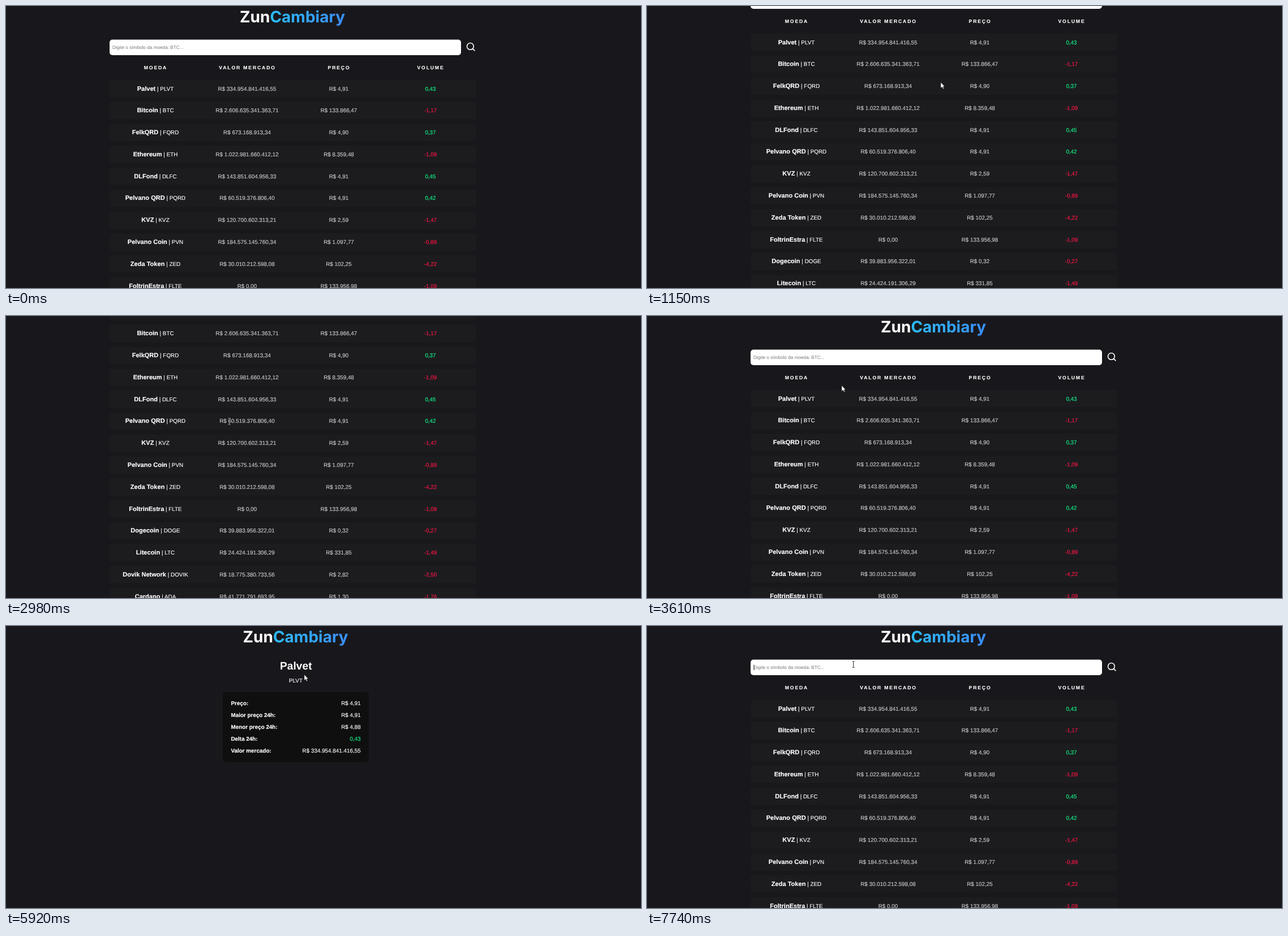
Animation of 1122x499 px, one loop 8 s. Source, as an HTML page:

```html
<!DOCTYPE html>
<html lang="pt-BR">
<head>
<meta charset="utf-8">
<title>Moedas</title>
<style>
  html, body { margin: 0; width: 100%; height: 100%; overflow: hidden; background: #18181c; }
  svg { display: block; font: 9.87px "Liberation Sans", Arial, sans-serif; fill: #fff; text-rendering: geometricPrecision; }
  .mid { text-anchor: middle; }
  .end { text-anchor: end; }
  .bold, .coin { font-weight: 700; }
  .coin { font-size: 11.06px; }
  .head { font-size: 8.64px; font-weight: 700; letter-spacing: 1.85px; }
  /* A hairline outline gives small text the weight of hinted type. */
  .ink { stroke: #fff; stroke-width: .16px; }
  .soft { fill: #cacaca; stroke: #cacaca; }
  .up { fill: #12f98a; stroke: #12f98a; }
  .down { fill: #ff1645; stroke: #ff1645; }
  .logo { font: 700 28px Inter, sans-serif; }
  #beam { mix-blend-mode: difference; }
</style>
</head>
<body>
<svg width="1122" height="499" viewBox="0 0 1122 499">
  <defs>
    <linearGradient id="blue" gradientUnits="userSpaceOnUse" x1="469" y1="4" x2="597" y2="36">
      <stop stop-color="#2cbcfa"/><stop offset="1" stop-color="#3a8eff"/>
    </linearGradient>
  </defs>
  <g id="page">
    <text class="logo mid" x="506" y="29">Zun<tspan fill="url(#blue)">Cambiary</tspan></text>
    <g id="list">
      <rect x="183" y="59.5" width="621" height="27.5" rx="5"/>
      <text x="188" y="76.3" font-size="8.22" fill="#757575">Digite o símbolo da moeda: BTC...</text>
      <path id="caret" d="M189 68.5v10" stroke="#000" stroke-width=".8"/>
      <g fill="none" stroke="#fff" stroke-width="1.6" stroke-linecap="round">
        <circle cx="820.4" cy="71.4" r="5.9"/><path d="M824.6 75.6l3.3 3.3"/>
      </g>
      <g id="heads"></g>
      <g id="rows"></g>
    </g>
    <g id="detail">
      <text class="bold mid" x="506.8" y="77.4" font-size="19.2">Palvet</text>
      <text class="mid ink" x="506.5" y="99.5">PLVT</text>
      <rect x="377.5" y="117" width="258" height="124" rx="5" fill="#0f0f0f"/>
      <g id="facts"></g>
    </g>
  </g>
  <path id="arrow" d="M0 0V10.2L2.4 8.1 4 11.6 5.7 10.9 4.1 7.5H7Z" stroke="#111" stroke-width=".5"/>
  <path id="beam" d="M-2-5.5H-.6L0-5 .6-5.5H2M0-5V5M-2 5.5H-.6L0 5 .6 5.5H2" fill="none" stroke="#ddd"/>
  <path id="hand" d="M-1 1Q0-.6 1 1V5L5.5 6Q7 6.3 6.8 8L5.8 11.5V13.5H-.8V12L-4 8.5Q-4.3 6.8-2.6 7.3L-1 8.5Z" stroke="#111" stroke-width=".5"/>
</svg>
<script>
const $ = id => document.getElementById(id);
const columns = [264, 426, 588, 750];
const rowStep = 38.78;
const tone = value => value[0] === '-' ? 'down' : 'up';
const text = (x, y, cls, body) => `<text x="${x}" y="${y}" class="ink ${cls}">${body}</text>`;

const coins = `Palvet|PLVT|334.954.841.416,55|4,91|0,43
Bitcoin|BTC|2.606.635.341.363,71|133.866,47|-1,17
FelkQRD|FQRD|673.168.913,34|4,90|0,37
Ethereum|ETH|1.022.981.660.412,12|8.359,48|-1,09
DLFond|DLFC|143.851.604.956,33|4,91|0,45
Pelvano QRD|PQRD|60.519.376.806,40|4,91|0,42
KVZ|KVZ|120.700.602.313,21|2,59|-1,47
Pelvano Coin|PVN|184.575.145.760,34|1.097,77|-0,89
Zeda Token|ZED|30.010.212.598,08|102,25|-4,22
FoltrinEstra|FLTE|0,00|133.956,98|-1,09
Dogecoin|DOGE|39.883.956.322,01|0,32|-0,27
Litecoin|LTC|24.424.191.306,29|331,85|-1,49
Dovik Network|DOVIK|18.775.380.733,56|2,82|-2,50
Cardano|ADA|41.771.791.693,95|1,30|-1,76`.split('\n').map(line => line.split('|'));

$('heads').innerHTML = ['MOEDA', 'VALOR MERCADO', 'PREÇO', 'VOLUME']
  .map((name, i) => text(columns[i] + .5, 112, 'head mid', name)).join('');

$('rows').innerHTML = coins.map(([name, symbol, cap, price, change], i) => {
  const y = 149.5 + i * rowStep;
  return `<rect x="183.3" y="${y - 18.5}" width="647.5" height="30.5" rx="4" fill="#1c1c1f"/>` +
    text(columns[0], y, 'mid', `<tspan class="coin">${name}</tspan> | ${symbol}`) +
    text(columns[1], y, 'mid soft', 'R$ ' + cap) +
    text(columns[2], y, 'mid soft', 'R$ ' + price) +
    text(columns[3], y, 'mid ' + tone(change), change);
}).join('');

$('facts').innerHTML = [['Preço:', 'R$ 4,91'], ['Maior preço 24h:', 'R$ 4,91'], ['Menor preço 24h:', 'R$ 4,88'],
  ['Delta 24h:', '0,43', 'up'], ['Valor mercado:', 'R$ 334.954.841.416,55']]
  .map(([label, value, cls = ''], i) => {
    const y = 140 + i * 20.95;
    return text(392, y, 'bold', label) + text(621.2, y, 'end ' + cls, value);
  }).join('');

// Each move: start, end, number of steps, then points along the way.
const pointerMoves = [
  [190, 680, 8, [1090, 490, 'arrow'], [1000, 400, 'arrow'], [800, 190, 'arrow'], [640, 66, 'arrow'], [519, 135, 'arrow']],
  [1490, 1960, 8, [519, 135, 'arrow'], [390, 180, 'arrow'], [246, 270, 'arrow'], [270, 320, 'arrow'], [322, 334, 'arrow']],
  [2220, 2500, 5, [322, 334, 'arrow'], [350, 260, 'arrow'], [406, 147, 'beam']],
  [2770, 2980, 4, [406, 147, 'beam'], [394.5, 186.5, 'beam']],
  [3130, 3460, 6, [394.5, 186.5, 'beam'], [346, 139, 'arrow']],
  [3610, 4090, 8, [346, 139, 'arrow'], [344, 123, 'arrow'], [325, 105, 'arrow'], [290, 88, 'arrow'],
    [255, 76, 'beam'], [225, 70, 'beam'], [205, 70, 'beam'], [195, 72, 'beam'], [191, 73, 'beam']],
  [4280, 4620, 6, [191, 73, 'beam'], [250, 84, 'beam'], [290, 112, 'arrow'], [279, 139, 'hand']],
  [4760, 4900, 2, [279, 139, 'hand'], [279.5, 145, 'hand'], [279.5, 145, 'arrow']],
  [5430, 6060, 10, [279.5, 145, 'arrow'], [315, 150, 'arrow'], [375, 166, 'arrow'], [455, 190, 'arrow'], [545, 210, 'arrow'],
    [610, 214, 'arrow'], [616, 180, 'arrow'], [575, 122, 'arrow'], [527, 86, 'arrow'], [533, 74, 'beam'], [536, 70, 'beam']],
  [6260, 6610, 6, [536, 70, 'beam'], [548, 45, 'arrow'], [561, 20, 'hand']],
  [7000, 7070, 2, [561, 20, 'hand'], [561, 20, 'hand']],
  [7270, 7740, 8, [561, 20, 'hand'], [500, 36, 'arrow'], [410, 58, 'arrow'], [372, 66, 'beam'], [364.8, 68, 'beam']]
];
const scrollMoves = [
  [1090, 1290, 4, [0], [22], [82], [134], [154]],
  [3130, 3460, 6, [154], [138], [102], [60], [24], [6], [0]]
];

function follow(moves, t) {
  const move = moves.filter(([start]) => t >= start).pop();
  if (!move) return null;
  const [start, end, steps, ...points] = move;
  // The small margin absorbs rounding in the step times.
  const step = Math.min(steps, Math.floor((t - start) / (end - start) * (steps - 1) + .15) + 1);
  const place = step / steps * (points.length - 1);
  const i = Math.floor(place + 1e-6), a = points[i], b = points[i + 1] || a;
  return a.map((v, k) => typeof v === 'number' ? v + (b[k] - v) * (place - i) : v);
}

const show = (id, on) => $(id).style.display = on ? '' : 'none';

function draw(now) {
  const t = now % 8000;
  const full = t < 4900 || t >= 7270;
  const [scroll] = follow(scrollMoves, t) || [0];
  $('page').setAttribute('transform', `translate(${full ? 0 : 5.5} ${-scroll})`);
  show('list', full || t >= 7000);
  show('rows', full);
  show('detail', t >= 5030 && t < 7000);
  show('caret', t >= 7670);

  const [x, y, shape] = follow(pointerMoves, t) || [0, 0, ''];
  for (const id of ['arrow', 'beam', 'hand']) {
    show(id, id === shape);
    $(id).setAttribute('transform', `translate(${x} ${y})`);
  }
  requestAnimationFrame(() => draw(performance.now() - origin));
}
const origin = performance.now();
draw(0);
</script>
</body>
</html>
```
